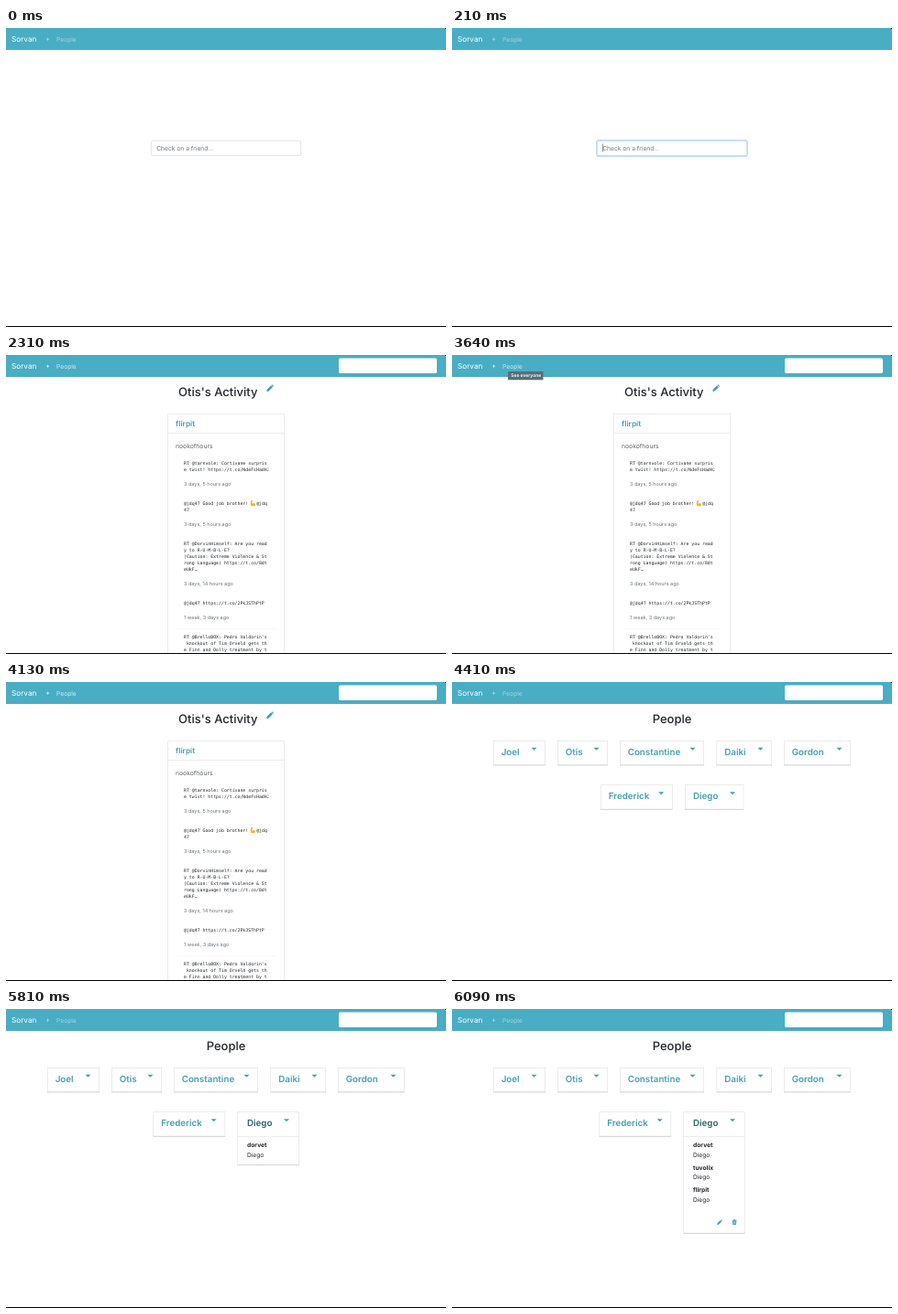
Animation, 480 px wide and 327 px high, one loop 8 s. Source, as an HTML page:

```html
<!DOCTYPE html>
<html lang="en">
<head>
<meta charset="utf-8">
<title>Friend activity</title>
<style>
  html, body { margin: 0; height: 100%; overflow: hidden; background: #000; }
  svg { display: block; width: 480px; height: 327px; }
  text { font-family: Inter, "Open Sans", sans-serif; text-rendering: geometricPrecision; white-space: pre; }
  .mono { font-family: "DejaVu Sans Mono", monospace; }
</style>
</head>
<body>
<svg id="stage" viewBox="0 0 480 327"></svg>
<script>
const LOOP = 8000, STEP = 70;
const TEAL = '#459fb1', DARK = '#28656f', BAR = '#49adc4', GRAY = '#6c757d';
const stage = document.getElementById('stage');

const text = (x, y, size, fill, str, weight = 400, extra = '') =>
  `<text x="${x}" y="${y}" font-size="${size}" fill="${fill}" font-weight="${weight}" ${extra}>${str}</text>`;
const box = (x, y, w, h, fill, extra = '') =>
  `<rect x="${x}" y="${y}" width="${w}" height="${h}" fill="${fill}" ${extra}/>`;
const path = (d, fill, extra = '') => `<path d="${d}" fill="${fill}" ${extra}/>`;
const pencil = (x, y, scale) =>
  path('M0 8l.4-2.4L5 1l2 2-4.6 4.6zM5.5.6l.4-.4q.5-.4 1 0l.9.9q.4.5 0 1l-.4.4z', TEAL,
    `transform="translate(${x} ${y}) scale(${scale})"`);

// CSS "ease" curve, cubic-bezier(.25, .1, .25, 1)
function ease(p) {
  if (p <= 0) return 0;
  if (p >= 1) return 1;
  const bez = (s, a, b) => 3 * s * (1 - s) ** 2 * a + 3 * s * s * (1 - s) * b + s ** 3;
  let lo = 0, hi = 1;
  for (let i = 0; i < 20; i++) {
    const mid = (lo + hi) / 2;
    if (bez(mid, .25, .25) < p) lo = mid; else hi = mid;
  }
  return bez(lo, .1, 1);
}

function navbar(t) {
  const home = t < 2310;
  const hover = !home && t < 4410 || t >= 4620 && t < 4690;
  const link = `rgba(255,255,255,${hover ? .75 : .5})`;
  return box(0, 0, 480, 24, BAR) +
    text(6, 15, 8.2, '#fff', 'Sorvan') +
    path('M43.9 12.2h3.4M45.6 10.5v3.4', 'none', `stroke="${link}" stroke-width=".8"`) +
    text(55, 14.5, 6.7, link, 'People') +
    (home ? '' : box(363, 3.6, 107, 16.4, '#fff', 'rx="1.7"')) +
    (t >= 3640 && t < 4130
      ? box(61, 18, 38.5, 9.3, '#566f77', 'rx=".6"') + text(64.2, 24.3, 5, '#fff', 'See everyone', 600)
      : '');
}

function home(t) {
  const focus = Math.min(t / 210, 1);
  const typed = 'Otis'.slice(0, [560, 700, 770, 910].filter(at => t >= at).length);
  let out = box(157.8, 122.8, 164.4, 17.4, 'none',
    `rx="2.2" stroke="#80bdff" stroke-opacity="${.5 * focus}" stroke-width="1.5"`) +
    box(158.4, 123.4, 163.2, 16.2, '#fff',
      `rx="1.7" stroke="${focus < 1 ? '#ced4da' : '#a5cdf3'}" stroke-width=".6"`);
  out += typed
    ? text(164.2, 133.7, 6.7, '#495057', typed, 400, 'id="typed"') +
      `<circle cx="311" cy="131.3" r="3.2" fill="#666"/>` +
      path('M309.7 130l2.6 2.6m0-2.6l-2.6 2.6', 'none', 'stroke="#fff" stroke-width=".8"')
    : text(164.2, 133.7, 6.7, GRAY, 'Check on a friend...');
  if (focus) out += box(164, 126.5, .6, 9, '#495057', 'id="caret"');
  return out;
}

const posts = [
  [120.4, '3 days, 5 hours ago', 'RT @tarnvole: Cortivane surpris', 'e twist! https://t.co/NdeFsHadHJ'],
  [164.4, '3 days, 5 hours ago', '@jdq47 Good job brother! <tspan x="273.2">@jdq</tspan>', '47'],
  [208.2, '3 days, 14 hours ago', 'RT @DorvinHimself: Are you read', 'y to R-U-M-B-L-E?',
    '(Caution: Extreme Violence &amp; St', 'rong Language) https://t.co/8dt', 'eUkF…'],
  [273.3, '1 week, 3 days ago', '@jdq47 https://t.co/2PkJSThPtP'],
  [310.3, '', "RT @BrelloBOX: Pedro Valdorin's", ' knockout of Tim Orveld gets th', 'e Finn and Dolly treatment by t']
];

function activity() {
  let out = text(188, 44.8, 13, '#212529', "Otis's Activity", 500) + pencil(284.3, 32.4, .95) +
    box(176.7, 64.7, 126.6, 300, '#fff', 'stroke="#dfdfdf" stroke-width=".6"') +
    path('M176.7 85.5h126.6', 'none', 'stroke="#dfdfdf" stroke-width=".6"') +
    path('M185.3 299.5h109.4', 'none', 'stroke="#f4f4f4" stroke-width=".6"') +
    text(185, 78, 8.3, TEAL, 'flirpit', 600) +
    text(185, 102.4, 6.8, '#5c6166', 'nookofhours');
  let body = '';
  for (const [y, age, ...lines] of posts) {
    lines.forEach((line, i) => body += text(194, y + i * 7.05, 4.87, '#212529', line, 400, 'class="mono"'));
    body += text(194, y + lines.length * 7.05 + 8.6, 5.5, GRAY, age);
  }
  // flexed arm
  body += path('M267 164.8q-.8-3 .2-5.4l1.6-.4.5 1.2-1 .7.2 1.6q1.6-1.2 3.2.2 1 1.4-.2 2.2-2 .8-4.5-.1z', '#efb52f');
  return out + `<g clip-path="url(#column)">${body}</g>`;
}

function person(name, x, right, y, color, height = 26.6, arrow = TEAL, pad = 8.7, arrowPad = 12.5) {
  const cx = right - arrowPad;
  return box(x + .3, y + .3, right - x - .6, height, '#fff', 'stroke="#dfdfdf" stroke-width=".6"') +
    path(`M${x} ${y + height + .3}H${right}`, 'none', 'stroke="#ccc" stroke-width=".7"') +
    text(x + pad, y + 15.5, 9.8, color, name, 600) +
    path(`M${cx - 3} ${y + 7.8}h6l-3 3z`, arrow);
}

function people(t) {
  const open = t >= 5810, grow = 106 * ease((t - 5740) / 350), shift = open ? 1.5 : 0;
  let out = text(218.7, 44.8, 13, '#212529', 'People', 500) +
    person('Joel', 45, 102, 64, TEAL) +
    person('Otis', 115, 170, 64, TEAL) +
    person('Constantine', 183, 275, 64, t >= 4830 && t < 4900 ? DARK : TEAL) +
    person('Daiki', 288.5, 349, 64, TEAL) +
    person('Gordon', 362, 435, 64, TEAL) +
    person('Frederick', 162 - shift, 240.7 - shift, 112.4, TEAL) +
    person('Diego', 254 - shift, 318.3 + shift, 112.4, open ? DARK : TEAL, 26.6 + grow,
      t >= 5460 && !open ? DARK : TEAL, 8.9 + shift, 12.3 + shift);
  if (!open) return out;
  let body = path('M252.5 139.4h67.3', 'none', 'stroke="#dfdfdf" stroke-width=".6"');
  ['dorvet', 'tuvolix', 'flirpit'].forEach((site, i) => {
    body += text(263, 151 + i * 24.7, 6.7, '#212529', site, 700) +
      text(263, 161.7 + i * 24.7, 6.6, '#212529', 'Diego');
  });
  body += pencil(289.3, 230.4, .7) +
    path('M305.5 230.7h1.6l.4-.6h1.2l.4.6h1.6v.7h-5.2zM305.9 231.8h4.4l-.3 4.3h-3.8z', TEAL) +
    path('M307.2 232.4v3m.9-3v3m.9-3v3', 'none', 'stroke="#fff" stroke-width=".35"');
  return out + `<clipPath id="fold">${box(252, 139, 68, grow)}</clipPath><g clip-path="url(#fold)">${body}</g>`;
}

function render(t) {
  const page = t < 2310 ? home(t) : t < 4410 ? activity() : people(t);
  stage.innerHTML = `<clipPath id="column">${box(190, 86, 96.3, 240)}</clipPath>
    <clipPath id="window"><path d="M0 0H478.5L480 1.5V326H0z"/></clipPath>
    <g clip-path="url(#window)">${box(0, 0, 480, 326, '#fff')}${page}${navbar(t)}</g>`;
  const typed = document.getElementById('typed');
  if (typed) document.getElementById('caret').setAttribute('x', 164.6 + typed.getComputedTextLength());
}

let last = -1;
function tick() {
  const t = Math.floor(performance.now() % LOOP / STEP) * STEP;
  if (t !== last) render(last = t);
  requestAnimationFrame(tick);
}
tick();
</script>
</body>
</html>
```
